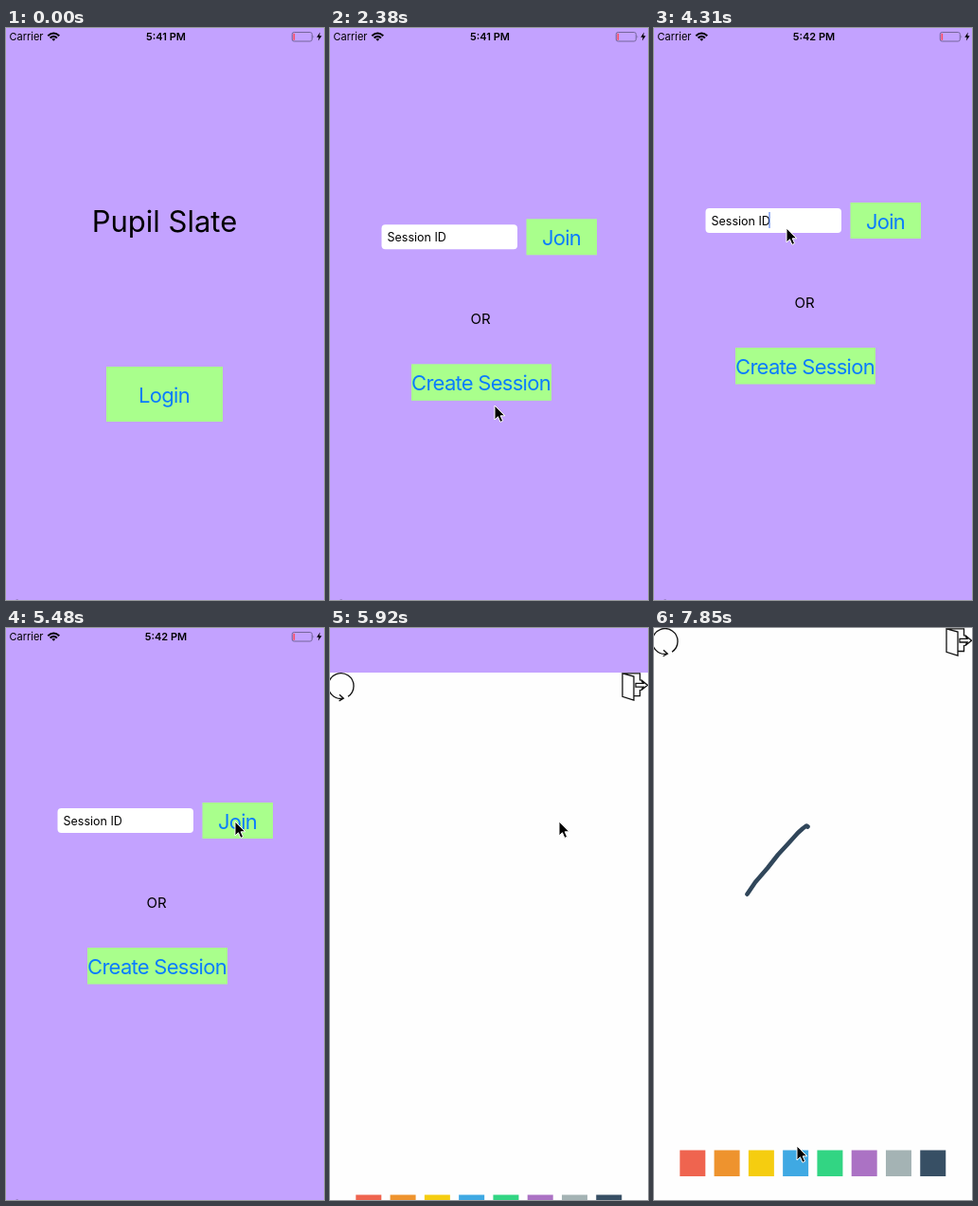
An HTML page that plays this animation: 336x603 px, repeating every 7.99 s.

```html
<!DOCTYPE html>
<html lang="en">
<head>
<meta charset="utf-8">
<title>Whiteboard app demo</title>
<style>
  html, body { margin: 0; width: 100%; height: 100%; overflow: hidden; }
  svg { display: block; width: 336px; height: 603px; font-family: Inter, Roboto, sans-serif; }
  .page { fill: #c3a2ff; }
  .button rect { fill: #a9ff8c; }
  .button text { fill: #0a7cff; font-size: 22px; letter-spacing: -.033em; }
  .middle, .button text { text-anchor: middle; }
  .line { fill: none; stroke: #111; stroke-width: 1.3; }
</style>
</head>
<body>
<svg viewBox="0 0 336 603">
  <g id="login">
    <rect class="page" width="336" height="603"/>
    <text class="middle" x="167.5" y="215" font-size="31">Pupil Slate</text>
    <g class="button">
      <rect x="106" y="357" width="123" height="58"/>
      <text x="167" y="395">Login</text>
    </g>
  </g>

  <g id="session">
    <rect class="page" width="336" height="603"/>
    <rect x="54.5" y="190" width="143.5" height="26" rx="4" fill="#fff"/>
    <text x="60.5" y="207.5" font-size="12.5">Session ID</text>
    <rect id="caret" x="121" y="194" width="2" height="17" fill="#3d6ff0"/>
    <g class="button">
      <rect x="207.5" y="184" width="74.5" height="38"/>
      <text x="244.5" y="211.5">Join</text>
    </g>
    <text class="middle" x="159" y="294.5" font-size="15">OR</text>
    <g class="button">
      <rect x="86" y="337" width="148" height="38.5"/>
      <text x="159.5" y="364.5">Create Session</text>
    </g>
  </g>

  <g id="status" font-size="11">
    <text x="3.5" y="13">Carrier</text>
    <g fill="none" stroke="#000" stroke-width="2">
      <path d="M44.3 8.3Q50.3 2.8 56.3 8.3M46.6 10.5Q50.3 7.2 54 10.5"/>
      <path d="M50.3 13.8L48.4 11.7Q50.3 10.3 52.2 11.7Z" fill="#000" stroke="none"/>
    </g>
    <text id="clock" class="middle" x="169" y="13" font-weight="600"></text>
    <rect x="302.3" y="4.5" width="21" height="9.5" rx="2" fill="none" stroke="#75669a"/>
    <rect x="303.5" y="5.8" width="1.6" height="7" fill="#ff4a5a"/>
    <path d="M324.5 7.5q1.6 1.7 0 3.5z" fill="#75669a"/>
    <path d="M331.8 4.5L328.3 9.8H330.6L329.9 13.5L333.6 8.3H331.2Z"/>
  </g>

  <g id="board">
    <rect width="336" height="603" fill="#fefefe"/>
    <path class="line" d="M19 25.2A13.4 13.4 0 1 0 14 27.2M10 23.2L14.3 27.2L9.6 29.8"/>
    <path class="line" d="M309 .8L321 4V29.2L309 25.3ZM309 .8H327.5V8.5M321 24.5H327.5V18M323 11.4H331L328.6 7.6L335.5 13.2L328.6 18.8L331 15H323Z"/>
    <g id="palette"></g>
    <path id="stroke" d="M98.5 280.5L107 268L120 253L131 239L143 226L152 216L157 211.5L161 208.5L162.5 209.5"
      fill="none" stroke="#30465a" stroke-width="4.6" stroke-linecap="round" stroke-linejoin="round"
      pathLength="1" stroke-dasharray="1 2"/>
  </g>

  <path id="cursor" d="M0 0V15L3.5 11.8L5.9 17.4L8.6 16.2L6.2 10.8H10.8Z" stroke="#fff"/>
</svg>

<script>
const LOOP = 7990, STEP = 148.2, HEIGHT = 603;
const $ = id => document.getElementById(id);
const COLORS = ['#ef644f', '#ee932e', '#f5cd10', '#3fa9e3', '#32d583', '#ab72c4', '#a4b3b4', '#374f64'];

$('palette').innerHTML = COLORS.map((color, i) =>
  `<rect x="${27.3 + i * 36.28}" y="550.5" width="27" height="27.5" fill="${color}"/>`).join('');

// [step, x, y]
const POINTER = [
  [3, 279, 432], [6, 188, 405], [8, 188, 405], [9, 196, 352], [10, 205, 294],
  [11, 160, 310], [12, 142, 352], [13, 174, 398], [17, 174, 398], [18, 156.5, 367],
  [19, 156, 362], [22, 140, 211], [31, 140, 211], [37, 242, 204], [41, 242, 204],
  [43, 165, 258], [44, 165, 258], [45, 112, 289], [46, 98, 280], [49, 162, 209],
  [50, 169, 300], [51, 160, 430], [52, 151, 515], [53, 151, 546]
];

function pointerAt(step) {
  const next = POINTER.findIndex(p => p[0] >= step);
  const b = POINTER[next], a = POINTER[Math.max(0, next - 1)];
  const u = b === a ? 0 : (step - a[0]) / (b[0] - a[0]);
  return [1, 2].map(i => a[i] + (b[i] - a[i]) * u);
}

// Critically damped spring, as in a modal sliding up
function slide(id, time, start) {
  const s = Math.max(0, time - start) / 1000 * 18.26;
  const y = HEIGHT * (1 + s) * Math.exp(-s);
  $(id).setAttribute('transform', `translate(0 ${y < .5 ? 0 : y})`);
}

function show(id, opacity) {
  $(id).style.opacity = Number(opacity);
}

function caretOpacity(step) {
  if (step === 29) return .5;
  return (step >= 22 && step < 26) || (step >= 30 && step < 33);
}

function render(now) {
  const step = Math.min(53, Math.floor((now % LOOP) / STEP + .1));
  const time = step * STEP;

  slide('session', time, 2075);
  slide('board', time, 5698);
  show('status', step < 39);
  show('caret', caretOpacity(step));
  $('clock').textContent = step < 20 ? '5:41 PM' : '5:42 PM';

  show('stroke', step >= 46);
  $('stroke').setAttribute('stroke-dashoffset', 1 - Math.min(1, Math.max(0, (step - 46) / 3)));

  show('cursor', step >= 3);
  $('cursor').setAttribute('transform', `translate(${pointerAt(step)})`);
}

const begin = performance.now();
(function frame() {
  render(performance.now() - begin);
  requestAnimationFrame(frame);
})();
</script>
</body>
</html>
```
